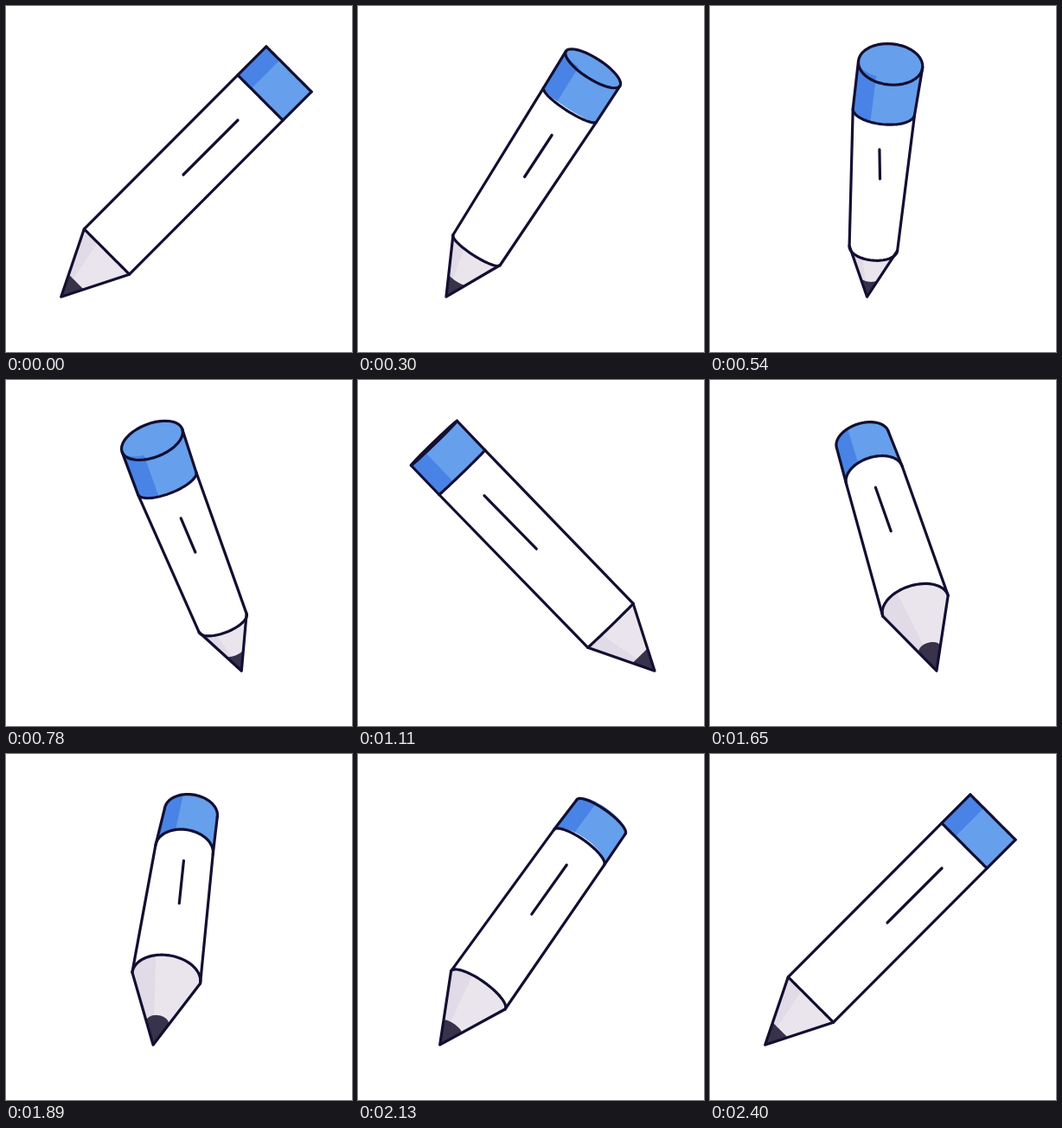
Write an HTML page with a canvas that moves like this. It is 400 px wide and 400 px high and loops after 2.43 s.

```html
<!DOCTYPE html>
<html lang="en">
<head>
<meta charset="utf-8">
<title>Turning pencil</title>
<style>
  html, body { margin: 0; width: 100%; height: 100%; overflow: hidden; background: #fff; }
  canvas { display: block; width: 400px; height: 400px; }
</style>
</head>
<body>
<canvas id="stage" width="400" height="400"></canvas>
<script>
const ctx = document.getElementById('stage').getContext('2d');
const LOOP = 2430, TURN = 2400, STEP = 30, AXIS = 205;
const INK = '#130f31', LEAD = '#38324a';
const WOOD = '#eae5ed', WOOD_DARK = '#e1dae7';
const BLUE = '#669fec', BLUE_DARK = '#4983e5';
const SPLIT = Math.acos(-0.4); // where the shaded strip ends on a ring

// cubic-bezier(.4, 0, .6, 1)
function ease(x) {
  let lo = 0, hi = 1;
  for (let i = 0; i < 24; i++) {
    const s = (lo + hi) / 2, r = 1 - s;
    if (1.2 * s * r * r + 1.8 * s * s * r + s * s * s < x) lo = s; else hi = s;
  }
  return lo * lo * (3 - 2 * lo);
}

// swing: sideways lean, tilt: top towards (+) or away from (-) the viewer
function poseAt(t) {
  const half = t % 1200 / 1200, quarter = t % 600 / 600;
  const sign = t < 1200 ? 1 : -1;
  const swing = sign * (1 - 2 * ease(half));
  const r = ease(quarter);
  const amount = half < 0.5 ? r : 1 - r;
  return { swing, tilt: sign * amount, amount, side: Math.sign(swing) * (1 - amount) };
}

function draw(t) {
  const { swing: u, tilt: e, amount: a, side: q } = poseAt(t);
  const near = e > 0, lag = u - q;
  const by = (front, back) => a * (near ? front : back);

  const tip = [AXIS - 141.3 * u, 336.2];
  const topC = [AXIS + 33 * u + 89 * q - 3.8 * a, 73 - 6 * a ** 3];
  const dx = tip[0] - topC[0], dy = tip[1] - topC[1], len = Math.hypot(dx, dy);
  const n = [dx / len, dy / len], h = [n[1], -n[0]];

  const ring = (c, w, b) => ({ c, w, b });
  const top = ring(topC, 37 + by(0.3, -6.5), by(24.2, -22));
  const bandX = AXIS + 89 * q + by(-4.9, -3.4) - (near ? 8.4 * lag : 0);
  const band = ring([bandX, 106 + by(16.5, 5)], 37 - by(1.2, 3.6), by(15, -24.5));
  const base = ring([AXIS - u * (88.5 + 9 * e), 284 - by(4, 26.5)], 37 + by(-9.3, 3), by(14.3, -27.5));
  const toTip = (p, k) => [tip[0] + (p[0] - tip[0]) * k, tip[1] + (p[1] - tip[1]) * k];
  const size = 0.33 + by(0.085, 0);
  const lead = ring(toTip(base.c, size), base.w * size, base.b * size);

  const at = (r, phi) => {
    const x = r.w * Math.cos(phi), y = r.b * Math.sin(phi);
    return [r.c[0] + h[0] * x + n[0] * y, r.c[1] + h[1] * x + n[1] * y];
  };
  const arc = (r, from = Math.PI, to = 0) =>
    Array.from({ length: 41 }, (_, i) => at(r, from + (to - from) * i / 40));
  const ends = r => [at(r, Math.PI), at(r, 0)];

  const trace = pts => {
    ctx.beginPath();
    pts.forEach(p => ctx.lineTo(p[0], p[1]));
  };
  const fill = (color, ...parts) => {
    trace(parts.flat());
    ctx.fillStyle = color;
    ctx.fill();
  };
  const line = (pts, closed) => {
    trace(pts);
    if (closed) ctx.closePath();
    ctx.stroke();
  };

  ctx.clearRect(0, 0, 400, 400);
  ctx.lineWidth = 3.2;
  ctx.lineCap = ctx.lineJoin = 'round';
  ctx.strokeStyle = INK;

  // cone
  fill(WOOD, arc(base), [tip]);
  fill(WOOD_DARK, arc(base, Math.PI, SPLIT), [tip]);
  fill(LEAD, arc(lead), [tip]);

  // cap; its colour drifts slightly off the outline in mid-tilt
  const drift = 10 * a * (1 - a);
  const capTop = near ? top : { ...top, b: top.b - drift };
  const capLow = { ...band, b: band.b - drift };
  const shadeTop = near ? { ...top, b: top.b * 0.7 } : capTop;
  fill(BLUE, arc(capTop), arc(capLow).reverse());
  if (near) fill(BLUE, arc(top, 0, 2 * Math.PI));
  fill(BLUE_DARK, arc(shadeTop, Math.PI, SPLIT), arc(capLow, SPLIT, Math.PI));

  // outlines
  const [topL, topR] = ends(top), [bandL, bandR] = ends(band), [baseL, baseR] = ends(base);
  line([topL, bandL, baseL, tip, baseR, bandR, topR]);
  line(arc(base));
  line(arc(band));
  if (near) line(arc(top, 0, 2 * Math.PI), true);
  else line(arc(top));

  // mark on the barrel
  line([
    [AXIS - lag * (near ? 52 : 19) - a, 195 + by(5, -23.5)],
    [AXIS + 63 * q + lag * (near ? -45 : 6) - 4 * a, 132 + by(34.5, -9)]
  ]);
}

function tick() {
  const t = Math.floor(performance.now() % LOOP / STEP) * STEP;
  draw(t % TURN);
  requestAnimationFrame(tick);
}
tick();
</script>
</body>
</html>
```
